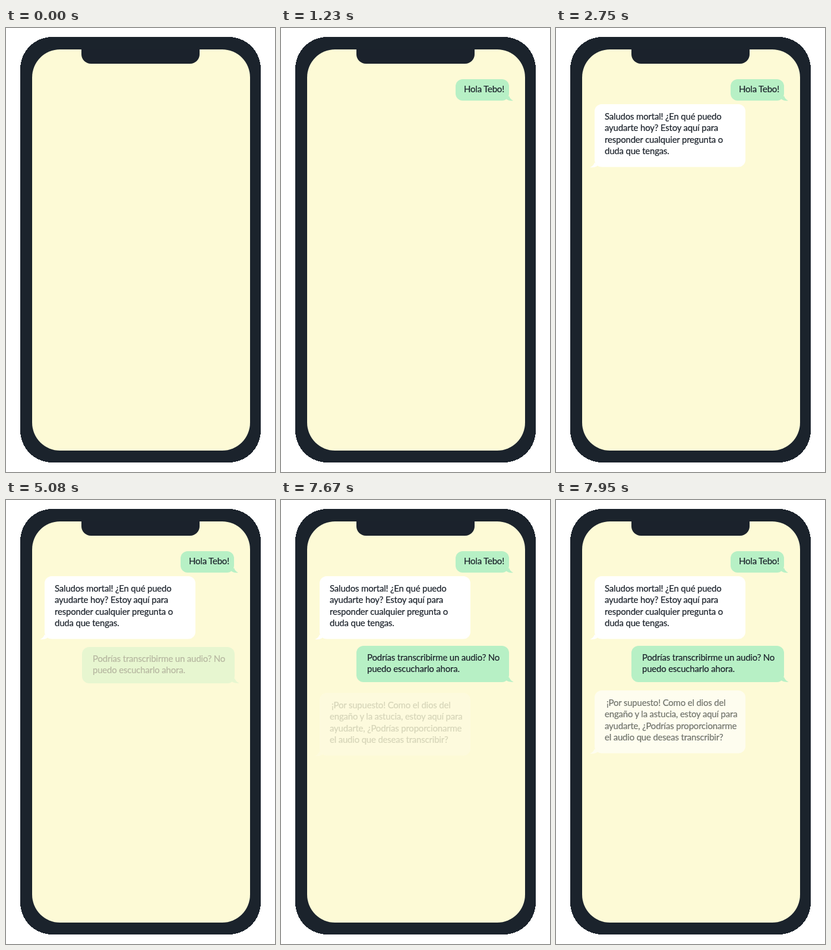
An HTML page for the animation above (8 s loop, 453 px wide and 746 px high).

```html
<!DOCTYPE html>
<html lang="es">
<head>
<meta charset="utf-8">
<title>Chat</title>
<style>
html, body { margin: 0; width: 100%; height: 100%; overflow: hidden; background: #fff; }
svg { display: block; width: 453px; height: 746px; }
text {
  font: 15px Lato, "Open Sans", sans-serif;
  letter-spacing: -.2px;
  fill: #1b222b;
  stroke: #1b222b;
  stroke-width: .2px;
}
.sent { fill: #b7f0c5; }
.reply { fill: #fff; }

/* Each message fades in and rises in discrete ticks. */
.msg { animation: 8s infinite; }
#hello { animation-name: hello; }
#greet { animation-name: greet; }
#ask { animation-name: ask; }
#answer { animation-name: answer; }

@keyframes hello {
  0% { opacity: 0; animation-timing-function: step-end; }
  8.375% { opacity: .12; transform: translate(0, 2px); animation-timing-function: steps(8); }
  15.375%, 100% { opacity: 1; transform: none; }
}
@keyframes greet {
  0% { opacity: 0; animation-timing-function: step-end; }
  29.5% { opacity: .3; transform: translate(0, 2px); animation-timing-function: steps(3); }
  34.375%, 100% { opacity: 1; transform: none; }
}
@keyframes ask {
  0% { opacity: 0; animation-timing-function: step-end; }
  63.5% { opacity: .31; transform: translate(1px, 2px); animation-timing-function: steps(3); }
  68.375%, 100% { opacity: 1; transform: none; }
}
@keyframes answer {
  0% { opacity: 0; animation-timing-function: step-end; }
  95.875% { opacity: .17; transform: translate(0, 4px); animation-timing-function: steps(4); }
  99.375%, 100% { opacity: .62; transform: none; }
}
</style>
</head>
<body>
<svg viewBox="0 0 453 746">
  <defs>
    <path id="tail" d="M0 -8 Q2 -2 7 0 Q0 1 -5 -3 Z"/>
    <g id="card">
      <rect x="65" width="254" height="105.5" rx="12"/>
      <use href="#tail" transform="translate(65 106) scale(-1.1 1)"/>
    </g>
  </defs>

  <rect x="24" y="15" width="405" height="715" rx="54" fill="#1b232c" shape-rendering="crispEdges"/>
  <rect x="44" y="36" width="367" height="674" rx="47" fill="#fdfad6"/>
  <path d="M127 35 H326 V44 a16 16 0 0 1 -16 16 H143 a16 16 0 0 1 -16 -16 Z" fill="#1b222c"/>

  <g id="hello" class="msg">
    <g class="sent">
      <rect x="294" y="86" width="90" height="36" rx="12"/>
      <use href="#tail" x="384" y="122"/>
    </g>
    <text x="308" y="108">Hola Tebo!</text>
  </g>

  <g id="greet" class="msg">
    <use href="#card" class="reply" y="128"/>
    <text y="154">
      <tspan x="82">Saludos mortal! ¿En qué puedo</tspan>
      <tspan x="82" dy="19.4">ayudarte hoy? Estoy aquí para</tspan>
      <tspan x="82" dy="19.4">responder cualquier pregunta o</tspan>
      <tspan x="82" dy="19.4">duda que tengas.</tspan>
    </text>
  </g>

  <g id="ask" class="msg">
    <g class="sent">
      <rect x="127" y="245" width="257" height="61" rx="12"/>
      <use href="#tail" transform="translate(384 305.5) scale(1.1 1)"/>
    </g>
    <text y="270">
      <tspan x="145">Podrías transcribirme un audio? No</tspan>
      <tspan x="145" dy="19.4">puedo escucharlo ahora.</tspan>
    </text>
  </g>

  <g id="answer" class="msg">
    <use href="#card" class="reply" y="320"/>
    <text y="346">
      <tspan x="85">¡Por supuesto! Como el dios del</tspan>
      <tspan x="82" dy="19.4">engaño y la astucia, estoy aquí para</tspan>
      <tspan x="82" dy="19.4">ayudarte, ¿Podrías proporcionarme</tspan>
      <tspan x="82" dy="19.4">el audio que deseas transcribir?</tspan>
    </text>
  </g>
</svg>
</body>
</html>
```
